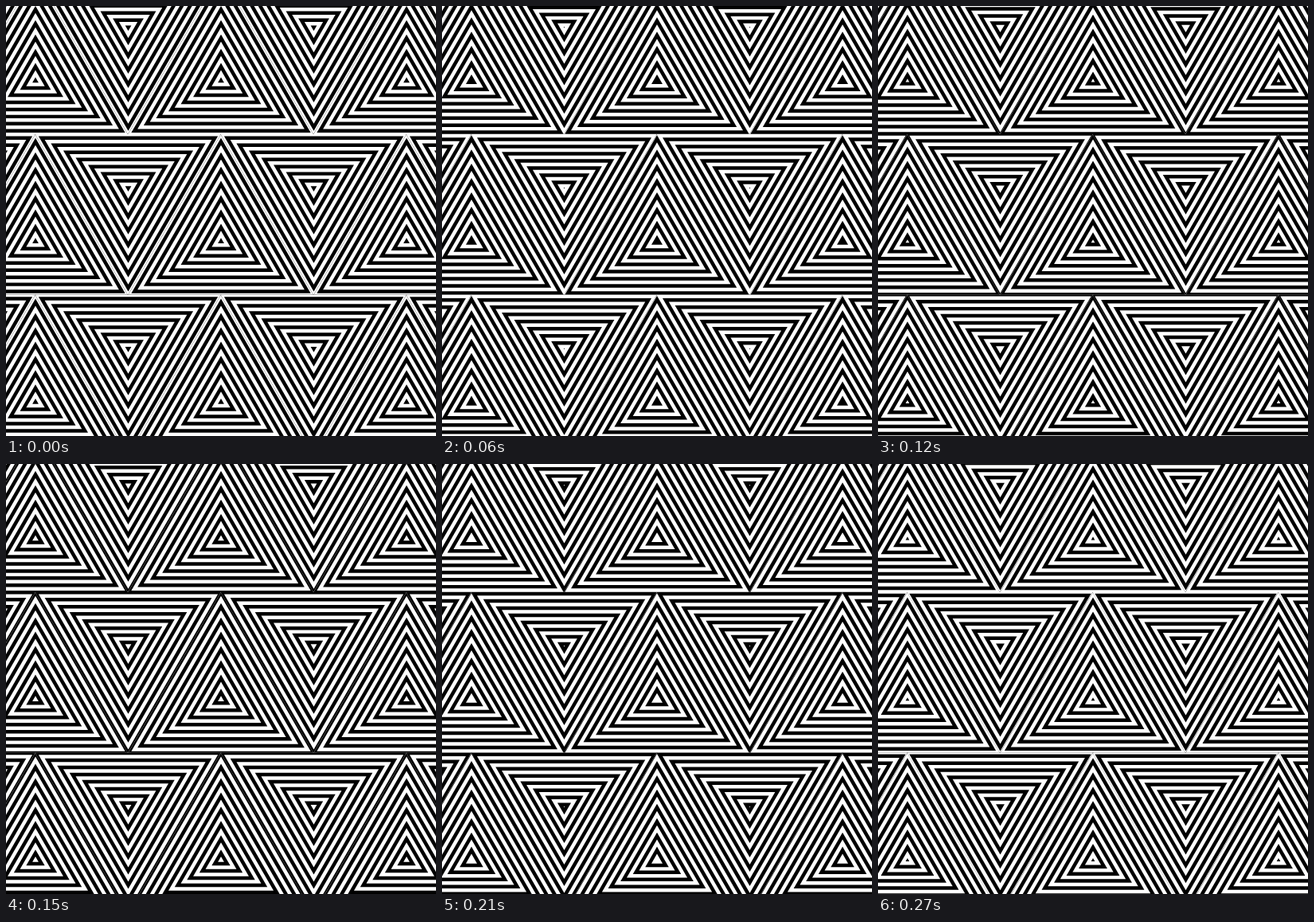
These frames come from a looping animation (540 px wide and 540 px high, 300 ms). An HTML page with a canvas:

```html
<!DOCTYPE html>
<html lang="en">
<head>
<meta charset="utf-8">
<title>Triangle waves</title>
<style>
  html, body { margin: 0; height: 100%; overflow: hidden; background: #fff; }
  canvas { display: block; width: 540px; height: 540px; }
</style>
</head>
<body>
<canvas id="stage" width="540" height="540"></canvas>
<script>
const ctx = document.getElementById('stage').getContext('2d');
const SIDE = 233;
const HEIGHT = SIDE * Math.sqrt(3) / 2;
const INRADIUS = HEIGHT / 3;
const PERIOD = INRADIUS / 7.5;
const LEFT = 37, TOP = 161.3 - HEIGHT;
const LOOP = 300, STEPS = 10;

// Equilateral triangle around its centre; dir is 1 when it points up, -1 when down.
function triangle(x, y, r, dir, color) {
  const half = r * Math.sqrt(3);
  ctx.fillStyle = color;
  ctx.beginPath();
  ctx.moveTo(x, y - 2 * r * dir);
  ctx.lineTo(x + half, y + r * dir);
  ctx.lineTo(x - half, y + r * dir);
  ctx.fill();
}

// Nested triangles, painted from the outside in.
function rings(x, y, dir, phase) {
  for (let j = 18; j >= -2; j--) {
    const r = (j / 2 + 0.25 + phase * dir) * PERIOD;
    // A slight overlap hides the seams between neighbours.
    if (r > 0) triangle(x, y, Math.min(r, INRADIUS + 0.3), dir, j % 2 ? '#fff' : '#000');
  }
}

function draw(now) {
  const phase = Math.floor(now % LOOP / LOOP * STEPS) / STEPS;
  for (let row = 0; row < 3; row++) {
    const y = TOP + row * HEIGHT;
    for (let col = -1; col < 3; col++) {
      const x = LEFT + col * SIDE;
      rings(x, y + 2 * INRADIUS, 1, phase);
      rings(x + SIDE / 2, y + INRADIUS, -1, phase);
    }
    rings(LEFT + 3 * SIDE, y + 2 * INRADIUS, 1, phase);
  }
}

const start = performance.now();
function tick() {
  draw(performance.now() - start);
  requestAnimationFrame(tick);
}
tick();
</script>
</body>
</html>
```
